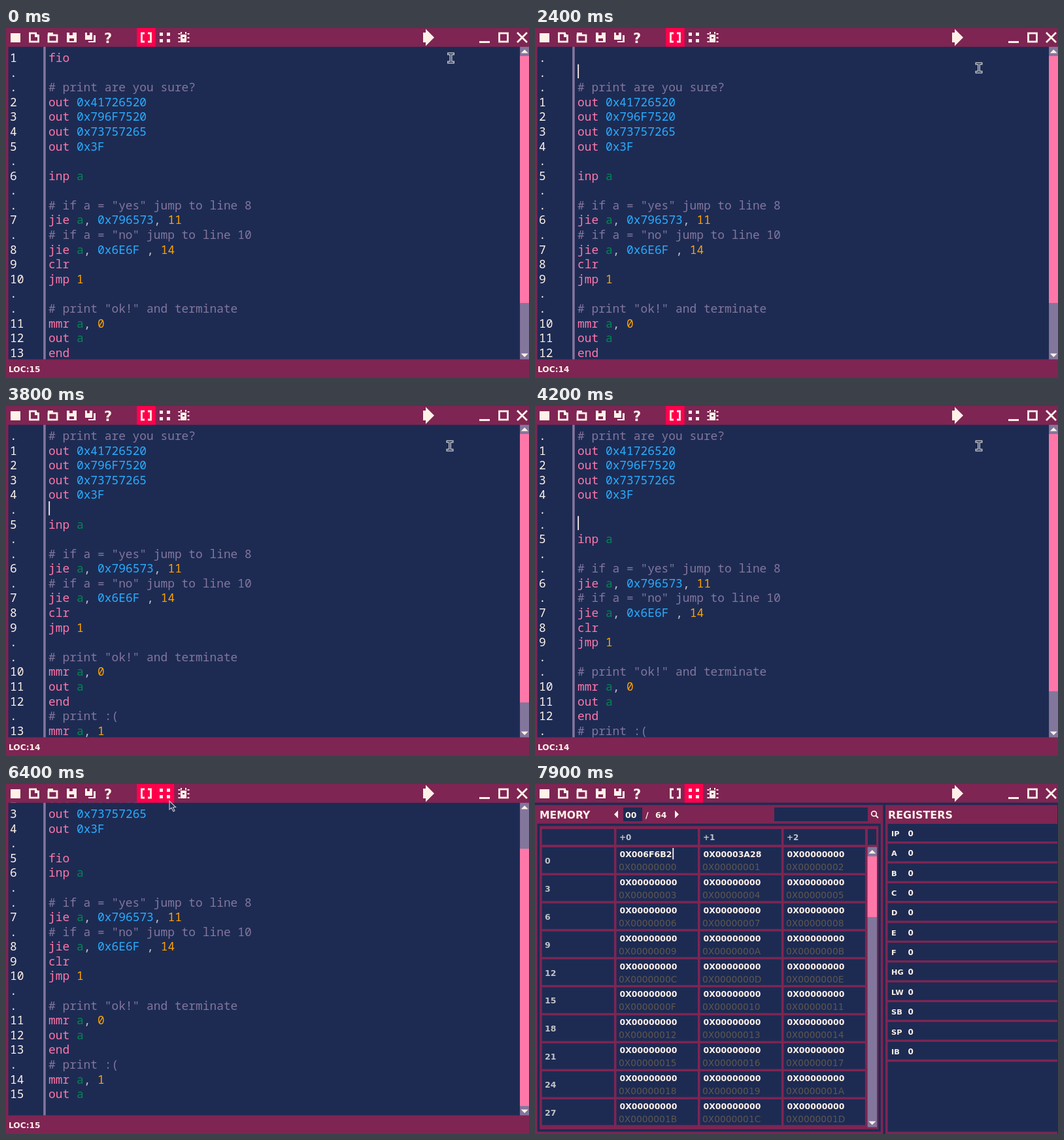
An HTML page with a canvas that plays this animation: 800 px wide and 536 px high, repeating every 8 s.

```html
<!DOCTYPE html>
<html lang="en">
<head>
<meta charset="utf-8">
<title>Assembly editor</title>
<style>
html, body { margin: 0; width: 100%; height: 100%; overflow: hidden; background: #1d2b53 }
canvas { display: block }
</style>
</head>
<body>
<canvas id="stage" width="800" height="536"></canvas>
<script>
const ctx = document.getElementById('stage').getContext('2d');
const NAVY = '#1d2b53', PLUM = '#7e2553', RED = '#ff004d', PINK = '#ff77a8', LAVENDER = '#83769c',
  CREAM = '#fff1e8', BLUE = '#29adff', GREEN = '#008751', ORANGE = '#ffa300', SILVER = '#c2c3c7', GREY = '#5f574f';
const CODE = '17.88px "Noto Sans Mono", monospace';
const ui = (size, weight = 'bold') => `${weight} ${size}px "DejaVu Sans", sans-serif`;
const LOOP = 8000, STEP = 100, ROWS = 21, ROW_H = 22.59, CHAR_W = 10.73;
const U = 536 / 150; // layout unit: frame lines are one unit thick

const base = `# print are you sure?
out 0x41726520
out 0x796F7520
out 0x73757265
out 0x3F

inp a

# if a = "yes" jump to line 8
jie a, 0x796573, 11
# if a = "no" jump to line 10
jie a, 0x6E6F , 14
clr
jmp 1

# print "ok!" and terminate
mmr a, 0
out a
end
# print :(
mmr a, 1
out a
`.split('\n');

// time, key, presses (one per step)
const keys = [[1100, 'top'], [1300, 'end'], [1500, 'select'], [2000, 'cut'], [2400, 'down', 2],
  [2800, 'back', 2], [3300, 'down', 5], [4100, 'enter'], [4600, 'paste']];
const press = {
  top: s => s.row = 0,
  end: s => s.col = s.lines[s.row].length,
  select: s => [s.sel, s.col] = [s.col, 0],
  cut: s => { s.lines[s.row] = ''; s.sel = 0; },
  down: s => s.row++,
  back: s => s.lines.splice(--s.row, 1),
  enter: s => s.lines.splice(++s.row, 0, ''),
  paste: s => s.col = (s.lines[s.row] = 'fio').length
};

// time, x, y
const mousePath = [[0, 680.5, 46], [100, 680.5, 46], [500, 679, 61], [5000, 679, 61],
  [5400, 398.5, 196], [5900, 398.5, 196], [6400, 250, 26], [6600, 250, 26], [7000, 212, 106], [LOOP, 212, 106]];

function rect(color, x, y, w, h) {
  ctx.fillStyle = color;
  ctx.fillRect(x, y, w, h);
}

function path(pts) {
  ctx.beginPath();
  for (let i = 0; i < pts.length; i += 2) ctx.lineTo(pts[i], pts[i + 1]);
}

function line(color, width, ...pts) {
  path(pts);
  ctx.strokeStyle = color;
  ctx.lineWidth = width;
  ctx.stroke();
}

// Triangle with its base centred on x, y and its tip offset by dx, dy
function triangle(x, y, dx, dy) {
  path([x - dy, y - dx, x + dx, y + dy, x + dy, y + dx]);
  ctx.fillStyle = CREAM;
  ctx.fill();
}

function text(str, x, y, color, font) {
  ctx.font = font;
  ctx.fillStyle = color;
  ctx.fillText(str, x, y);
}

function stateAt(t) {
  const s = { lines: ['fio', '', ...base], row: 5, col: 0, sel: 0 };
  for (const [start, key, count = 1] of keys)
    for (let i = 0; i < count; i++) if (t >= start + i * STEP) press[key](s);
  return s;
}

function tokenColor(token) {
  if (token[0] === '#') return LAVENDER;
  if (token.startsWith('0x')) return BLUE;
  if (token === 'a') return GREEN;
  if (token === ',') return SILVER;
  return /\d/.test(token) ? ORANGE : PINK;
}

function scrollbar(x, y, h, from, size) {
  const w = 4 * U, c = x + w / 2;
  rect(LAVENDER, x, y, w, h);
  rect(PINK, x, y + w + from, w, size);
  triangle(c, y + 10, 0, -5.5);
  triangle(c, y + h - 9, 0, 5.5);
}

function toolbar(codeOn, memoryOn) {
  const block = (...box) => rect(CREAM, ...box);
  const frame = (...box) => {
    ctx.strokeStyle = CREAM;
    ctx.lineWidth = 2.8;
    ctx.strokeRect(...box);
  };
  rect(PLUM, 0, 0, 800, 8 * U);
  if (codeOn) rect(RED, 56 * U, 0, 8 * U, 8 * U);
  if (memoryOn) rect(RED, 64 * U, 0, 8 * U, 8 * U);

  block(7, 8, 15, 14);
  frame(36.5, 8, 13, 13);
  rect(PLUM, 47, 6, 5, 4);
  block(44, 9, 4, 5);
  frame(65, 11, 13, 10);
  block(64, 7, 8, 3);
  block(93, 7, 15, 15);
  rect(PLUM, 97, 7, 5, 4);
  rect(PLUM, 97, 16, 7, 4);
  block(126, 11, 11, 11);
  rect(PLUM, 126, 9, 8, 11);
  block(121, 7, 11, 11);
  rect(PLUM, 124, 7, 4, 4);
  text('?', 150, 22.5, CREAM, ui(21));

  for (const side of [-1, 1]) {
    const x = 214.5 + side * 7;
    line(CREAM, 2.8, x - side * 4.5, 8, x, 8, x, 21, x - side * 4.5, 21);
    for (const y of [7, 17]) block(240.5 + side * 5.5, y, 5, 5);
    for (const y of [8, 14, 20]) block(270.5 + side * 7, y, 3, 2);
    block(270.5 + side * 3.5, 6, 2, 3);
  }
  block(267, 10, 9, 12);
  rect(PLUM, 270, 14, 3, 2);

  block(638, 7, 4, 15);
  triangle(642, 14.5, 13, 0);
  line(CREAM, 15, 640, 14.5, 646, 14.5);
  block(724, 20, 16, 3);
  frame(754.5, 8, 13, 13);
  line(CREAM, 2.8, 782, 7, 797, 22);
  line(CREAM, 2.8, 797, 7, 782, 22);
}

function editor(t) {
  const { lines, row, col, sel } = stateAt(t);
  const scroll = Math.max(0, Math.min(3, (t - 5500) / STEP));
  const top = 8 * U, height = 134 * U;
  rect(PLUM, 0, 0, 800, 536);
  rect(NAVY, U, top, 219 * U, height);
  rect(LAVENDER, 16 * U, top, U, height);

  ctx.save();
  ctx.beginPath();
  ctx.rect(0, top, 220 * U, height);
  ctx.clip();
  rect(LAVENDER, 65, 33, sel * CHAR_W, 21);
  let loc = 0;
  lines.forEach((str, i) => {
    const y = 52 + (i - scroll) * ROW_H;
    const isCode = str && str[0] !== '#';
    if (isCode) loc++;
    if (i < lines.length - 1) text(isCode ? loc : '.', 6, y, CREAM, CODE);
    for (const m of str.matchAll(/#.*|\w+|,/g))
      text(m[0], 65 + m.index * CHAR_W, y, tokenColor(m[0]), CODE);
  });
  if (t >= 300 && t < 5100) rect(CREAM, 65.3 + col * CHAR_W, 33 + row * ROW_H, 1.8, 21.5);
  ctx.restore();

  const unit = (height - 8 * U) / lines.length;
  scrollbar(220 * U, top, height, scroll * unit, ROWS * unit);
  text('LOC:' + loc, 4, 526.5, CREAM, ui(12.2));
  toolbar(true, t >= 6300);
}

const hex = n => '0X' + n.toString(16).toUpperCase().padStart(8, '0');

function memory(t) {
  rect(NAVY, 0, 0, 800, 536);
  rect(PLUM, 0, 9 * U, 149 * U, 141 * U);
  text('MEMORY', 7, 52.5, CREAM, ui(15.6));
  triangle(127, 46.5, -6, 0);
  triangle(214, 46.5, 6, 0);
  rect(NAVY, 135, 36, 29, 21);
  text('00', 138, 51.5, CREAM, ui(12.5));
  text('/', 169, 51.5, CREAM, ui(12.5));
  text('64', 184, 51.5, CREAM, ui(12.5));
  rect(NAVY, 366, 36, 143, 21);
  ctx.beginPath();
  ctx.arc(518.5, 45.5, 3.8, 0, 7);
  ctx.strokeStyle = CREAM;
  ctx.lineWidth = 1.8;
  ctx.stroke();
  line(CREAM, 2, 521, 48, 525, 52);

  rect(NAVY, U, 17 * U, 147 * U, 132 * U);
  rect(PLUM, 2 * U, 18 * U, 145 * U, 130 * U);
  const column = c => c ? 124.5 + (c - 1) * 128 : 10.7;
  const cell = (c, y, h) => rect(NAVY, column(c), y, c ? 124.4 : 110.2, h);
  for (let c = 0; c < 4; c++) {
    cell(c, 69, 24);
    if (c) text('+' + (c - 1), column(c) + 4.5, 86, SILVER, ui(12));
  }
  rect(NAVY, 509, 69, 13, 24);
  for (let r = 0; r < 10; r++) {
    const y = 97 + r * 42.88;
    for (let c = 0; c < 4; c++) {
      cell(c, y, 39.4);
      if (!c) {
        text(r * 3, 15, y + 25, SILVER, ui(12.5));
        continue;
      }
      const x = column(c) + 5, address = r * 3 + c - 1;
      let value = hex([0x6F6B21, 0x3A28][address] || 0);
      if (!address && t >= 7700) value = value.slice(0, -1);
      text(value, x, y + 15, CREAM, ui(12.5));
      if (!address && t >= 7300) rect(CREAM, x + 1 + ctx.measureText(value).width, y + 1, 1.8, 17.5);
      text(hex(address), x - 1.5, y + 35, GREY, ui(13.8, 'normal'));
    }
  }
  scrollbar(508.7, 96.5, 429, 0, 93);

  rect(PLUM, 150 * U, 9 * U, 263, 141 * U);
  text('REGISTERS', 540, 52.5, CREAM, ui(15.9));
  'IP A B C D E F HG LW SB SP IB'.split(' ').forEach((name, i) => {
    const y = 61 + i * 30.35;
    rect(NAVY, 151 * U, y, 261, 27);
    text(name, 545, y + 19, CREAM, ui(11.3));
    text('0', 570.5, y + 19, CREAM, ui(12));
  });
  rect(NAVY, 151 * U, 425.5, 261, 149 * U - 425.5);
  toolbar(false, true);
}

function mouse(t) {
  if (t >= 7300) return;
  const i = mousePath.findIndex(p => p[0] > t);
  const [t0, x0, y0] = mousePath[i - 1], [t1, x1, y1] = mousePath[i];
  const k = (t - t0) / (t1 - t0);
  const x = x0 + (x1 - x0) * k, y = y0 + (y1 - y0) * k;
  if (t >= 6300 && t < 7000) {
    path([x, y, x, y + 13, x + 3, y + 10.5, x + 6, y + 16, x + 8, y + 15, x + 5.5, y + 9.5, x + 9.5, y + 9.5]);
    ctx.closePath();
    ctx.fillStyle = NAVY;
    ctx.fill();
    ctx.strokeStyle = SILVER;
    ctx.lineWidth = 1.2;
    ctx.stroke();
    return;
  }
  for (const [color, width, reach] of [[SILVER, 4, 5.5], [NAVY, 1.2, 4]]) {
    line(color, width, x, y - 6.5, x, y + 6.5);
    for (const side of [-6.5, 6.5]) line(color, width, x - reach, y + side, x + reach, y + side);
  }
}

function frame(now) {
  const t = Math.floor(now % LOOP / STEP) * STEP;
  (t < 6500 ? editor : memory)(t);
  mouse(t);
  requestAnimationFrame(frame);
}
requestAnimationFrame(frame);
</script>
</body>
</html>
```
